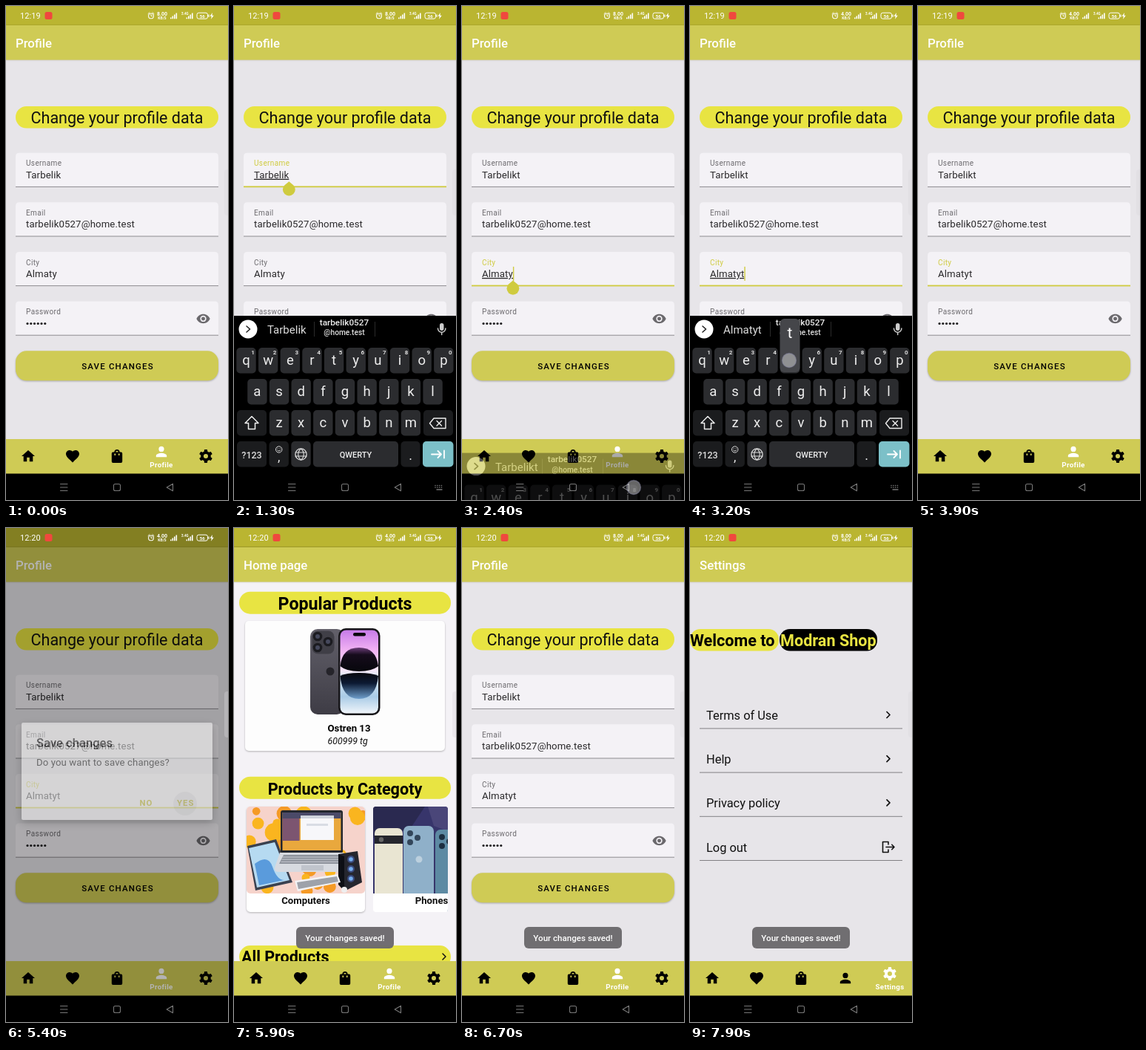
These frames come from a looping animation (300x665 px, 8 s). An HTML page:

```html
<!DOCTYPE html>
<html lang="en">
<head>
<meta charset="utf-8">
<title>Profile editing</title>
<style>
html, body { margin: 0; width: 100%; height: 100%; overflow: hidden; background: #000; }
svg { display: block; font-family: Roboto, sans-serif; }
text { white-space: pre; }
.shadow { filter: drop-shadow(0 1px 1px #0004); }
.line { fill: none; stroke-linecap: round; stroke-linejoin: round; }
</style>
</head>
<body>
<svg id="stage" width="300" height="665" viewBox="0 0 300 665"></svg>
<script>
const OLIVE = '#cfcb55', YELLOW = '#e8e442', ACCENT = '#cfcb3f', GREY = '#e7e5e9', PALE = '#f4f2f6';
const USER = 'Tarbelik', LOGIN = 'tarbelik0527', HOST = '@home.test', CITY = 'Almaty';
const LOOP = 8000;

// Markup helpers
const rect = (x, y, w, h, fill, rx = 0, more = '') =>
  `<rect x="${x}" y="${y}" width="${w}" height="${h}" rx="${rx}" fill="${fill}" ${more}/>`;
const circle = (x, y, r, fill, more = '') => `<circle cx="${x}" cy="${y}" r="${r}" fill="${fill}" ${more}/>`;
const text = (x, y, size, str, fill = '#111', more = '') =>
  `<text x="${x}" y="${y}" font-size="${size}" fill="${fill}" ${more}>${str}</text>`;
const shape = (d, fill, more = '') => `<path d="${d}" fill="${fill}" ${more}/>`;
const line = (d, stroke, width = 1.5, more = '') =>
  `<path class="line" d="${d}" stroke="${stroke}" stroke-width="${width}" ${more}/>`;
const group = (id, body) => `<g id="${id}">${body}</g>`;
const range = (n, f) => Array.from({ length: n }, (_, i) => f(i)).join('');
const gradient = (id, stops) => `<linearGradient id="${id}" x2="0" y2="1">` +
  stops.map(([at, color]) => `<stop offset="${at}" stop-color="${color}"/>`).join('') + '</linearGradient>';
const MID = 'text-anchor="middle"', MEDIUM = 'font-weight="500"', BOLD = 'font-weight="700"';

const page = (id, title, bg, body) => group(id,
  rect(0, 26, 300, 557, bg) + body +
  rect(0, 26, 300, 46.6, OLIVE, 0, 'style="filter:drop-shadow(0 .5px .8px #0003)"') +
  text(13, 56, 16.8, title, '#fff', MEDIUM));

const EYE = 'M12 4.5C7 4.5 2.73 7.61 1 12c1.73 4.39 6 7.5 11 7.5s9.27-3.11 11-7.5c-1.73-4.39-6-7.5-11-7.5zM12 17a5 5 0 110-10 5 5 0 010 10zm0-8a3 3 0 100 6 3 3 0 000-6z';
const ICONS = [
  'M10 20v-6h4v6h5v-8h3L12 3 2 12h3v8z',
  'M12 21.35l-1.45-1.32C5.4 15.36 2 12.28 2 8.5 2 5.42 4.42 3 7.5 3c1.74 0 3.41.81 4.5 2.09C13.09 3.81 14.76 3 16.5 3 19.58 3 22 5.42 22 8.5c0 3.78-3.4 6.86-8.55 11.54z',
  'M18 6h-2a4 4 0 00-8 0H6a2 2 0 00-2 2v12a2 2 0 002 2h12a2 2 0 002-2V8a2 2 0 00-2-2zM10 10a1 1 0 01-2 0V8h2zM12 4a2 2 0 012 2h-4a2 2 0 012-2zM16 10a1 1 0 01-2 0V8h2z',
  'M12 12a4 4 0 100-8 4 4 0 000 8zm0 2c-2.67 0-8 1.34-8 4v2h16v-2c0-2.66-5.33-4-8-4z'
].map(d => `<path d="${d}"/>`);
ICONS.push('<circle cx="12" cy="12" r="7.6"/>' +
  range(3, i => `<rect x="9.6" y="2" width="4.8" height="20" rx="1" transform="rotate(${i * 60} 12 12)"/>`) +
  circle(12, 12, 3.4, OLIVE));

// Profile page
const FIELDS = [['Username', USER], ['Email', LOGIN + HOST], ['City', CITY], ['Password', '']];
const fieldY = i => 197.7 + i * 66.6;
const field = ([label, value], i) => {
  const y = fieldY(i);
  return shape(`M13 ${y + 46}v-41q0-5 5-5h264q5 0 5 5v41z`, PALE) +
    rect(13, y + 45.2, 274, 1, '#8d8b8f', 0, `id="rule${i}"`) +
    text(27, y + 17.6, 10, label, '#6c6a6e', `id="label${i}" letter-spacing=".38"`) +
    text(27, y + 34, 13.2, value, '#2a292b', `id="value${i}" letter-spacing=".13"`);
};
const profile = page('profile', 'Profile', GREY,
  rect(13, 135, 274, 29.5, YELLOW, 14.7) +
  text(150, 158.3, 21.5, 'Change your profile data', '#111', MID) +
  FIELDS.map(field).join('') +
  range(6, i => circle(29 + i * 4.75, 427.5, 1.6, '#1d1c1e')) +
  shape(EYE, '#6b696d', 'transform="translate(256.6 411) scale(.83)"') +
  rect(13, 464.3, 274, 40, OLIVE, 15, 'class="shadow"') +
  rect(13, 464.3, 274, 40, '#fff', 15, 'id="press"') +
  text(151, 489, 11.5, 'SAVE CHANGES', '#000', `${MID} ${MEDIUM} letter-spacing="1.15"`) +
  rect(0, 0, 1.4, 19, ACCENT, 0, 'id="caret"') +
  group('handle', shape('M0 0L6 5A8.4 8.4 0 11-6 5Z', ACCENT)));

// Home page
const heading = (y, str, size) =>
  rect(7, y, 286, 30, YELLOW, 15) + text(150, y + 24.2, size, str, '#000', `${MID} ${BOLD}`);
const handset = (x, y, fill, lens) =>
  rect(x, y, 41, 110, fill, 7) + range(3, i => circle(x + 9 + (i % 2) * 10, y + 10 + i * 6, 4, lens));
const noise = n => Math.abs(Math.sin(n * 127.1) * 43758.5) % 1;
const laptop =
  rect(63, 380, 84, 58, '#23262d', 3) + rect(65.5, 383, 79, 51, '#e9a83d') +
  rect(65.5, 383, 79, 8, '#4b4a68') + rect(65.5, 391, 23, 30, '#7c5570') +
  rect(90, 387, 45, 33, '#f7f7fa') + rect(90, 387, 45, 4, '#cfd3dc') + rect(98, 398, 29, 3, '#d9dce4') +
  shape('M62 437h86l11 20q1 6-5 6H60q-6 0-5-6z', '#d7dae0') + shape('M67 440h77l6 12H61z', '#8d929b') +
  range(3, i => line(`M${66 - i} ${443 + i * 3.2}h${78 + i * 2}`, '#d7dae0', .8)) + rect(91, 454, 30, 7, '#c0c4cc');
const computers = '<g clip-path="url(#clipA)">' +
  rect(17, 375, 160, 117, '#f6d3cb') +
  range(34, i => circle(17 + 160 * noise(i + 1), 375 + 117 * noise(i + 51), 5 + 9 * noise(i + 91), i % 3 ? '#fab51f' : '#f59a26')) +
  shape('M18 428l39-9 22 58-50 11z', '#3a4150') + shape('M20 431l35-8 20 51-44 10z', '#b6daf1') +
  shape('M28 452q18-14 24 4t16 18l-34 7z', '#5a9bdc') + laptop +
  shape('M141 439l26-4 6 42-24 12z', '#25262e') + shape('M141 439l8 3v47l-8-9z', '#0d0f15') +
  range(3, i => circle(158, 446 + i * 13, 5, '#3b4a7c') + circle(158, 446 + i * 13, 2.8, '#73aef0')) +
  shape('M82 475l58-9 4 11-58 12z', '#f3f3f5') + shape('M85 477l54-8 2 7-54 10z', '#9ea2aa') +
  circle(149, 487, 4, '#eee') + '</g>';
const phones = '<g clip-path="url(#clipB)">' +
  rect(188, 375, 160, 142, '#fff', 5) + rect(188, 375, 160, 117, '#37356b') +
  shape('M188 375h70l-20 30-50 12z', '#2a2950') + shape('M262 375h30v34l-22-8z', '#4a4679') +
  rect(190, 404, 38, 100, '#e9e5d2', 7) + rect(190, 414, 38, 11, '#25262d') + circle(199, 419.5, 3.2, '#666') +
  handset(229, 401, '#8fb0c9', '#33465a') + circle(250, 446, 4.5, '#bcd0de') +
  handset(272, 406, '#5d8aa3', '#1d2e40') +
  rect(188, 492, 160, 25, '#fff') + text(267, 506, 13.2, 'Phones', '#111', `${MID} ${BOLD}`) + '</g>';
const popularPhone =
  rect(103, 136, 46, 115, 'url(#back)', 10) + rect(105.5, 138.5, 30, 31, '#403f47', 8) +
  [[113, 146], [113, 161], [127, 153]].map(([x, y]) => circle(x, y, 6.3, '#1b1b20') + circle(x, y, 3, '#45485c')).join('') +
  circle(130, 193, 5.5, '#25242a') +
  rect(141, 135, 56.5, 117, '#161519', 10) + rect(143.5, 137.5, 51.5, 112, 'url(#screen)', 8) +
  shape('M143.5 186Q146 161 169 161T195 186Q186 193 169 193T143.5 186Z', 'url(#dome)') +
  shape('M143.5 199Q152 195 169 195T195 199Q192 230 169 230T143.5 199Z', 'url(#bowl)') +
  rect(161, 141, 17, 4.5, '#08080a', 2.2);
const home = page('home', 'Home page', PALE,
  heading(85.7, 'Popular Products', 23.2) +
  rect(15, 125, 270, 175, '#fdfdfd', 5, 'class="shadow"') + popularPhone +
  text(126.5, 273.7, 13.2, 'Ostren 13', '#000', BOLD) +
  text(126.5, 291, 12.4, '600999 tg', '#111', 'font-style="italic"') +
  heading(334.7, 'Products by Categoty', 21.6) +
  rect(17, 375, 160, 142, '#fff', 5, 'class="shadow"') + computers +
  text(97, 506, 13.2, 'Computers', '#111', `${MID} ${BOLD}`) + phones +
  rect(7, 562, 286, 30, YELLOW, 15) + text(10, 585, 21.5, 'All Products', '#000', BOLD) +
  line('M282 573l4 4-4 4', '#111'));

// Settings page
const settings = page('settings', 'Settings', GREY,
  rect(0, 136, 120, 29.5, YELLOW, 14) + text(0, 159, 21.6, 'Welcome to', '#000', BOLD) +
  rect(121, 136, 132, 29.5, '#000', 14) + text(122, 159, 21.6, 'Modran Shop', YELLOW, BOLD) +
  ['Terms of Use', 'Help', 'Privacy policy', 'Log out'].map((s, i) => {
    const y = 258 + i * 59.2;
    return text(22, y, 16.4, s) + rect(13, y + 11.4, 274, 1, '#828084') +
      (i < 3 ? line(`M266 ${y - 10.5}l4 4-4 4`, '#111', 1.7) : '');
  }).join('') +
  line('M268 426v-3.5h-7.5v14h7.5v-3.5M265 429.5h11m-3.2-3.2l3.2 3.2-3.2 3.2', '#111', 1.6));

const nav = rect(0, 583, 300, 47, OLIVE) +
  ICONS.map((d, i) => group('tab' + i, `<g transform="scale(.9) translate(-12 -12)">${d}</g>`)).join('') +
  ['Profile', 'Settings'].map((s, i) =>
    text(210 + i * 60, 621.3, 9.8, s, '#fff', `id="name${i}" ${MID} ${BOLD} letter-spacing=".3"`)).join('');

// Dialog and toast
const dialog = group('dialog',
  rect(21, 262, 258, 131, '#fff', 2, 'style="filter:drop-shadow(0 4px 6px #0006)"') +
  text(41, 295, 16.6, 'Save changes', '#1b1b1b', MEDIUM) +
  text(41, 320, 13.2, 'Do you want to save changes?', '#333', 'letter-spacing=".1"') +
  text(180.5, 374, 11.4, 'NO', ACCENT, `${BOLD} letter-spacing="1"`) +
  text(231, 374, 11.4, 'YES', ACCENT, `${BOLD} letter-spacing="1"`) +
  circle(242, 371, 16, '#000', 'id="ripple"'));
const toast = group('toast', rect(84, 537, 132, 29, '#6c6a6d', 6, 'opacity=".96"') +
  text(150, 556, 11.6, 'Your changes saved!', '#fff', `${MID} ${MEDIUM}`));

// Keyboard
const PITCH = 29.65, KEY = '#2b2c2f', DARK = '#1b1c1e', INK = '#eee';
const key = (x, y, w, fill = KEY) => rect(x, y, w, 34.5, fill, 5);
const keyRow = (letters, x0, y, digits) => range(letters.length, i => {
  const x = x0 + i * PITCH;
  return key(x - 13.2, y, 26.4) + text(x, y + 23, 18.5, letters[i], INK, MID) +
    (digits ? text(x + 9, y + 9, 8, (i + 1) % 10, '#ddd', `${MID} ${BOLD}`) : '');
});
const keyboard = group('keyboard',
  rect(0, 417, 300, 248, '#000') +
  circle(19, 435, 12.5, '#fff') + line('M17 431l4.5 4-4.5 4', '#222', 1.6) +
  text(45, 441, 15, USER, '#ddd', 'id="hint"') +
  rect(108, 425, 1, 20, '#2a2a2a') + rect(190, 425, 1, 20, '#2a2a2a') +
  text(149, 429.5, 11.8, LOGIN, INK, `${MID} ${MEDIUM}`) + text(149, 443, 10.2, HOST, '#ddd', `${MID} ${MEDIUM}`) +
  rect(278, 427, 5.5, 10, '#ccc', 2.7) + line('M275.5 434a5.2 5.2 0 0010.4 0M280.7 439.5v3', '#ccc') +
  keyRow('qwertyuiop', 16.5, 460, true) + keyRow('asdfghjkl', 31.4, 502) + keyRow('zxcvbnm', 61, 544) +
  key(4, 544, 40, DARK) + line('M24 552.5l-9 9h4.5v8h9v-8h4.5z', INK) +
  key(256, 544, 40, DARK) + line('M270 555h16v13.5h-16l-5.5-6.7zM274 558.5l6.5 6.5m0-6.5l-6.5 6.5', INK, 1.4) +
  key(4, 586, 40, DARK) + text(24, 608.5, 12.5, '?123', '#ddd', `${MID} ${MEDIUM}`) +
  key(47.5, 586, 26.4, DARK) + circle(60.7, 597, 4.2, 'none', 'stroke="#ddd"') +
  line('M58.7 598q2 2.6 4 0M59.2 595.6v.1M62.2 595.6v.1', '#ddd', 1) + text(60.7, 613, 17, ',', INK, MID) +
  key(77.3, 586, 26.4) + circle(90.5, 603.5, 7.6, 'none', 'stroke="#ddd" stroke-width="1.3"') +
  line('M83 601h15M83 606h15M90.5 596c-5 4-5 11 0 15c5-4 5-11 0-15', '#ddd', 1.1) +
  key(107, 586, 115) + text(164.5, 607.5, 11, 'QWERTY', INK, `${MID} ${MEDIUM}`) +
  key(225.5, 586, 26, DARK) + text(238.5, 611, 18, '.', INK, MID) +
  key(255, 586, 41.5, '#7cc0c8') + line('M267 603.5h13m-4.5-4.5l4.5 4.5-4.5 4.5M284 598.5v10', '#fff', 1.8) +
  group('popup', rect(121.5, 421, 27, 72, '#45464a', 6) + text(135, 447, 21, 't', '#fff', MID)) +
  line('M272 645.5h11M272 648h11', '#777', 1.6, 'stroke-dasharray=".1 2.7"') + line('M274 651h7', '#777', 1.4));

// System bars
const bars = x => range(4, i => rect(x + i * 2.5, 15.5 - i * 2, 1.6, 1.8 + i * 2, '#fff'));
const systemTop = text(19, 17, 11, '', '#fff', 'id="clock" letter-spacing=".1"') + rect(52.5, 8, 10, 10, '#f0483e', 2.5) +
  circle(196, 13.4, 3.4, 'none', 'stroke="#fff" stroke-width="1.1"') +
  line('M196 11.5v2h1.5M192 10.5l2-1.8M200 10.5l-2-1.8', '#fff', .9) +
  text(211, 13, 7, '', '#fff', `id="speed" ${MID} ${BOLD}`) + text(211, 18.4, 5, 'KB/S', '#fff', `${MID} ${BOLD}`) +
  bars(222) + text(237, 12, 4.6, '3.4G', '#fff', BOLD) + bars(243.5) +
  rect(258, 9.2, 14.5, 8, 'none', 2.5, 'stroke="#fff"') + rect(273.4, 11.5, 1.2, 3.4, '#fff') +
  text(265.2, 15.5, 6, '56', '#fff', `${MID} ${BOLD}`) + shape('M279 9l-3.5 4.8h2.3l-.8 4 3.8-5h-2.4z', '#fff') +
  rect(295, 220, 9, 62, '#d9d8dc', 4, 'opacity=".35"');
const systemNav = line('M73.5 643.5h9.5M73.5 648h9.5M73.5 652.5h9.5', '#777', 1.1) +
  rect(145.5, 643.5, 9, 9, 'none', 2, 'stroke="#777" stroke-width="1.1"') +
  line('M225.5 643.2v9.6l-8.3-4.8z', '#777', 1.1);

const $ = id => document.getElementById(id);
$('stage').innerHTML = '<defs>' +
  gradient('back', [[0, '#62606a'], [1, '#3e3c45']]) +
  gradient('screen', [[0, '#c77be8'], [.25, '#f3b4f4'], [.48, '#f6e6f8'], [.56, '#dcebf6'], [.8, '#a9cbe6'], [1, '#f0f5fa']]) +
  gradient('dome', [[0, '#6b3d78'], [.3, '#160c1c'], [1, '#07070c']]) +
  gradient('bowl', [[0, '#07080e'], [.4, '#0c1a33'], [1, '#6f9fcc']]) +
  `<clipPath id="clipA">${rect(17, 375, 160, 117, '#000', 5)}</clipPath>` +
  `<clipPath id="clipB">${rect(188, 375, 101, 142, '#000', 4)}</clipPath></defs>` +
  rect(0, 0, 300, 26, '#bab531') +
  profile + home + settings + nav + rect(0, 0, 300, 630, '#000', 0, 'id="dim"') + dialog +
  rect(0, 629.5, 300, 36, '#000') + keyboard + toast + systemTop + systemNav +
  circle(0, 0, 9.5, '#fff', 'id="touch" fill-opacity=".4" stroke="#8888a4" stroke-opacity=".5" stroke-width="1.3"');

// x, y, down, up
const TOUCHES = [
  [60, 228, 700, 850], [134, 477, 1600, 1760], [60, 362, 1900, 2050], [232, 648, 2150, 2460],
  [60, 362, 2620, 2780], [134, 477, 3080, 3220], [232, 648, 3420, 3600], [150, 485, 4400, 4580],
  [242.5, 372, 5120, 5330], [210, 606, 6100, 6250], [270, 606, 7300, 7450]
];

const set = (id, attrs) => { for (const k in attrs) $(id).setAttribute(k, attrs[k]); };
const write = (id, str) => { if ($(id).textContent !== str) $(id).textContent = str; };

function draw(t) {
  const ramp = (a, b) => Math.min(1, Math.max(0, (t - a) / (b - a)));
  const within = (a, b) => t >= a && t < b;
  const fade = (id, v) => set(id, { opacity: v, display: v > 0 ? 'inline' : 'none' });

  write('clock', t < 5400 ? '12:19' : '12:20');
  write('speed', within(2500, 6100) ? '4.00' : '8.00');

  // Typing and focus
  const name = USER + (t >= 1750 ? 't' : ''), town = CITY + (t >= 3200 ? 't' : '');
  write('value0', name);
  write('value2', town);
  write('hint', t < 2750 ? name : town);
  const open = ramp(800, 1150) - ramp(2200, 2470) + ramp(2750, 3000) - ramp(3550, 3850);
  const focus = within(800, 2000) ? 0 : within(2000, 6000) ? 2 : -1;
  for (let i = 0; i < 4; i++) {
    const on = i === focus;
    set('rule' + i, { fill: on ? ACCENT : '#8d8b8f', height: on ? 1.8 : 1, y: fieldY(i) + (on ? 44.7 : 45.2) });
    set('label' + i, { fill: on ? ACCENT : '#6c6a6e' });
    set('value' + i, { 'text-decoration': on && open > .1 ? 'underline' : 'none' });
  }
  const caretOn = open > .1 && focus >= 0;
  if (caretOn) {
    const x = 27 + $('value' + focus).getComputedTextLength(), y = fieldY(focus);
    set('caret', { x, y: y + 20 });
    set('handle', { transform: `translate(${x} ${y + 38.5})` });
  }
  fade('caret', caretOn && (t - (focus ? 2000 : 800)) % 1000 < 500 ? 1 : 0);
  fade('handle', caretOn && (within(900, 1750) || within(2000, 2600) || within(2780, 3200)) ? 1 : 0);
  fade('keyboard', open > 0 ? .1 + .9 * open : 0);
  set('keyboard', { transform: `translate(0 ${248 * (1 - open)})` });
  fade('popup', within(1620, 1760) || within(3090, 3220) ? 1 : 0);

  // Saving
  fade('press', within(4400, 4700) ? .25 * (1 - ramp(4400, 4700)) : 0);
  const ask = ramp(4650, 4850) - ramp(5300, 5500);
  fade('dim', .6 * ask);
  fade('dialog', ask);
  fade('ripple', t >= 5120 ? .06 : 0);
  fade('toast', ramp(5600, 5800));

  // Navigation
  fade('home', ramp(5450, 5650) - ramp(6250, 6450));
  fade('settings', ramp(7420, 7640));
  const moved = ramp(7420, 7600);
  [0, 0, 0, 1 - moved, moved].forEach((s, i) => {
    const g = Math.round(255 * s);
    set('tab' + i, { transform: `translate(${30 + i * 60} ${606 - 6 * s})`, fill: `rgb(${g},${g},${g})` });
  });
  fade('name0', 1 - moved);
  fade('name1', moved);

  const hit = TOUCHES.find(([, , a, b]) => within(a, b));
  fade('touch', hit ? 1 : 0);
  if (hit) set('touch', { cx: hit[0], cy: hit[1] });
}

const start = performance.now();
function tick() {
  draw((performance.now() - start) % LOOP);
  requestAnimationFrame(tick);
}
tick();
</script>
</body>
</html>
```
